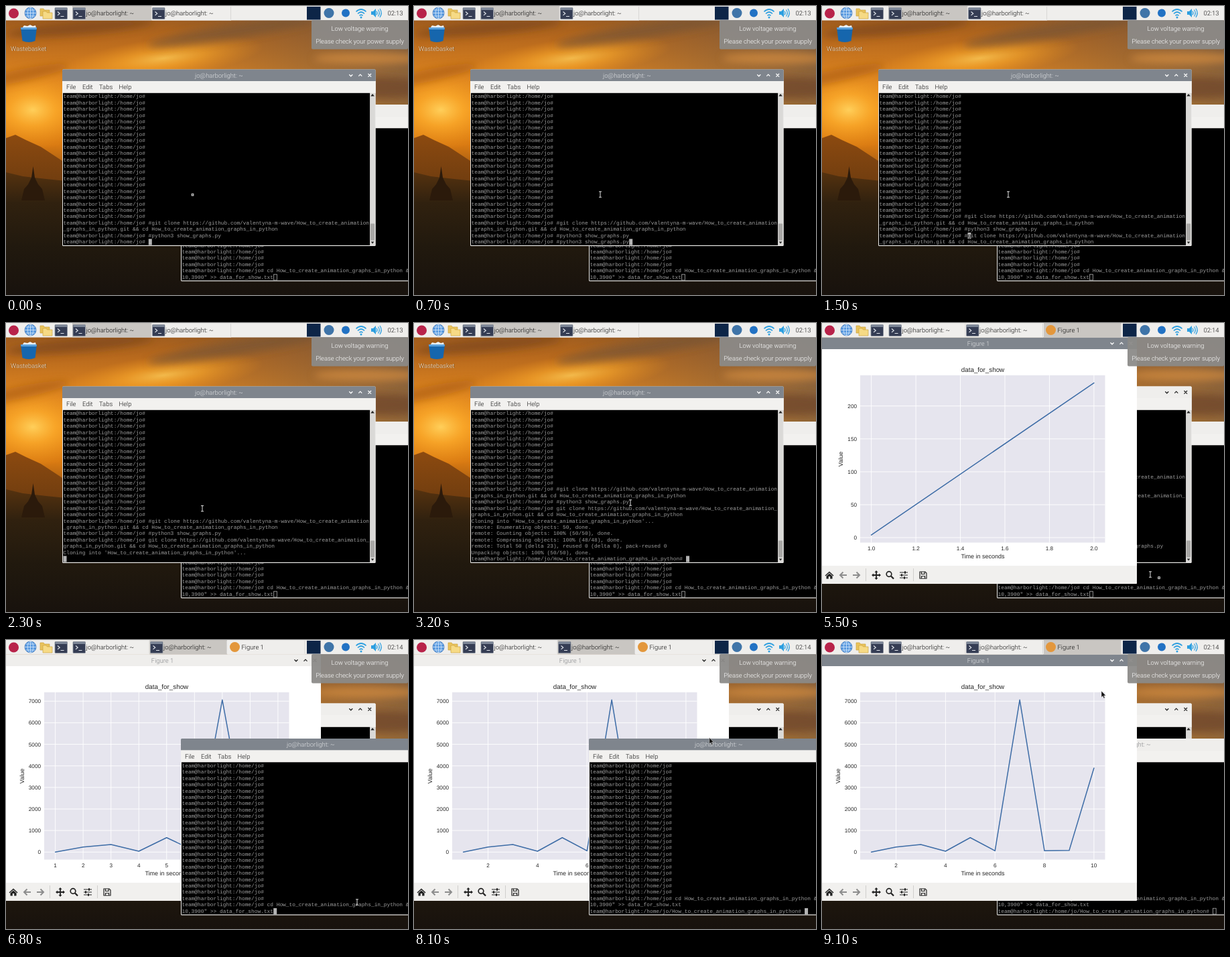
Animation of 600x431 px, one loop 9200 ms. Source, as an HTML page:

```html
<!DOCTYPE html>
<html lang="en">
<head>
<meta charset="utf-8">
<title>Animated graph demo</title>
<style>
  html, body { margin: 0; width: 100%; height: 100%; overflow: hidden; background: #1a130d; }
  svg { display: block; width: 600px; height: 431px; }
  text { white-space: pre; text-rendering: geometricPrecision; }
  .ui { font: 300 9.43px Roboto, sans-serif; }
  .mono { font: 7.857px "Liberation Mono", monospace; fill: #9c9c9c; }
  .plot { font: 8.18px "Liberation Sans", sans-serif; fill: #262626; }
  .mid { text-anchor: middle; }
  .end { text-anchor: end; }
  .bar { fill: #efeeec; }
  .title { fill: #85878a; }
  .btn { fill: none; stroke: #222; stroke-width: 1.3; }
  .focus .bar { fill: #7f858d; }
  .focus .title { fill: #dfe1e3; }
  .focus .btn { stroke: #fff; }
</style>
</head>
<body>
<svg id="stage" viewBox="0 0 600 431" xmlns="http://www.w3.org/2000/svg">
  <defs>
    <linearGradient id="sky" x1="0" y1="0" x2="0" y2="1">
      <stop offset="0" stop-color="#8f5420"/>
      <stop offset=".12" stop-color="#b96a1d"/>
      <stop offset=".24" stop-color="#dc8420"/>
      <stop offset=".36" stop-color="#ec8f1a"/>
      <stop offset=".48" stop-color="#d97a12"/>
      <stop offset=".6" stop-color="#8a4d12"/>
      <stop offset="1" stop-color="#1a130d"/>
    </linearGradient>
    <linearGradient id="east" x1="0" y1="0" x2="1" y2="0">
      <stop offset=".4" stop-color="#6b5646" stop-opacity="0"/>
      <stop offset="1" stop-color="#6b5646" stop-opacity=".7"/>
    </linearGradient>
    <linearGradient id="hill" x1="0" y1="0" x2="0" y2="1">
      <stop offset="0" stop-color="#8c4a10"/>
      <stop offset="1" stop-color="#5f350f"/>
    </linearGradient>
    <linearGradient id="land" x1="0" y1="0" x2="0" y2="1">
      <stop offset="0" stop-color="#55320f"/>
      <stop offset=".25" stop-color="#30210f"/>
      <stop offset=".6" stop-color="#21190e"/>
      <stop offset="1" stop-color="#18120d"/>
    </linearGradient>
    <radialGradient id="sun">
      <stop offset="0" stop-color="#ffcf5a"/>
      <stop offset=".4" stop-color="#fcac2c" stop-opacity=".75"/>
      <stop offset="1" stop-color="#f0951c" stop-opacity="0"/>
    </radialGradient>
    <filter id="soft" x="-50%" y="-100%" width="200%" height="300%"><feGaussianBlur stdDeviation="6"/></filter>
  </defs>

  <g id="wallpaper">
    <rect width="600" height="431" fill="url(#sky)"/>
    <rect width="600" height="200" fill="url(#east)"/>
    <ellipse cx="40" cy="155" rx="85" ry="60" fill="url(#sun)"/>
    <ellipse cx="235" cy="78" rx="150" ry="30" fill="url(#sun)" opacity=".75" transform="rotate(-7 235 78)"/>
    <g filter="url(#soft)">
      <ellipse cx="110" cy="33" rx="110" ry="10" fill="#7d461b" opacity=".7" transform="rotate(-5 110 33)"/>
      <ellipse cx="340" cy="38" rx="130" ry="11" fill="#7a5433" opacity=".7" transform="rotate(-9 340 38)"/>
      <ellipse cx="20" cy="104" rx="75" ry="9" fill="#a85a14" opacity=".65" transform="rotate(-12 20 104)"/>
      <ellipse cx="540" cy="78" rx="80" ry="9" fill="#cf8a40" opacity=".8"/>
      <ellipse cx="560" cy="122" rx="80" ry="16" fill="#70492c" opacity=".8"/>
    </g>
    <path d="M0 197L14 192 30 200 52 210 84 231 140 250V310H0Z" fill="url(#hill)"/>
    <path d="M0 248L25 254 60 258 100 262H600V431H0Z" fill="url(#land)"/>
    <path d="M23 290L27 273 33 266 38 256 40.500 239 43 256 48 266 54 273 58 290Z" fill="#2b1a0b"/>
  </g>

  <g id="bin">
    <path d="M24 33l3-4 5 1 4-2 4 2 4-1 1 4z" fill="#e9f1f6"/>
    <path d="M22 32H46L43.500 52Q34 56 24.500 52Z" fill="#1666ad"/>
    <path d="M22 32H46L45.500 35H22.500Z" fill="#5aa2de"/>
    <text class="ui mid" x="34.500" y="67.200" fill="#33200c" opacity=".6">Wastebasket</text>
    <text class="ui mid" x="33.800" y="66.500" fill="#f3ece0">Wastebasket</text>
  </g>

  <g id="windows"></g>
  <g id="panel"></g>
  <g id="note">
    <rect x="456" y="21" width="144" height="43.500" rx="2" fill="#8c8b89" opacity=".94"/>
    <g class="ui mid" fill="#fff">
      <text x="528" y="37.300">Low voltage warning</text>
      <text x="528" y="55.800">Please check your power supply</text>
    </g>
  </g>
  <g id="mouse">
    <path id="beam" d="M-2-4.200H2M0-4.200V4.200M-2 4.200H2" fill="none" stroke="#ddd"/>
    <path id="arrow" d="M0-2V7.500L2.100 5.500 3.600 9 5.200 8.300 3.700 5H6.600Z" fill="#111" stroke="#eee" stroke-width=".5"/>
  </g>
  <rect id="dot" width="2.600" height="2.600" fill="#000" stroke="#eee"/>
</svg>

<script>
const LOOP = 9200, STEP = 100;
const CW = 4.714, RH = 9.43, ROWS = 24;
const $ = id => document.getElementById(id);
const at = (table, t) => table.filter(s => s[0] <= t).pop();

// ---------- window parts ----------
const HOST = 'jo@harborlight: ~';

function buttons(x, y) {
  return `<path class="btn" d="M${x - 30.5} ${y - 1}l2.500 2.500 2.500-2.500M${x - 16.5} ${y + 1.3}l2.500-2.500 2.500 2.500
    M${x - 2.3} ${y - 2.3}l4.600 4.600m0-4.600l-4.600 4.600"/>`;
}

function makeWindow(id, x, y, w, h, title, body) {
  const g = document.createElementNS('http://www.w3.org/2000/svg', 'g');
  g.id = id;
  g.innerHTML = `<rect x="${x}" y="${y}" width="${w}" height="${h}" rx="1.500" fill="#e9e8e6"/>
    <path class="bar" d="M${x} ${y + 17.5}v-16q0-1.500 1.500-1.500h${w - 3}q1.500 0 1.500 1.500v16z"/>
    <text class="ui mid title" x="${x + w / 2}" y="${y + 12.3}">${title}</text>
    ${buttons(x + w - 9, y + 8.8)}${body}`;
  $('windows').append(g);
  return g;
}

function makeTerm(id, x, y, cols) {
  const w = cols * CW + 10.5, h = 263.5, sx = x + w - 8.5;
  const menu = [['File', 6], ['Edit', 30], ['Tabs', 55], ['Help', 84.5]];
  let body = `<rect x="${x}" y="${y + 17.5}" width="${w}" height="18" fill="#f2f1ef"/>`;
  for (const [name, dx] of menu)
    body += `<text class="ui" x="${x + dx}" y="${y + 29.5}" fill="#111">${name}</text>`;
  body += `<rect x="${x + 1}" y="${y + 35.3}" width="${w - 9.5}" height="${h - 36.5}" fill="#000"/>
    <rect x="${sx}" y="${y + 35.3}" width="7.500" height="${h - 36.5}" fill="#dad9d7"/>
    <rect x="${sx + .8}" y="${y + 230}" width="6" height="25" rx="1" fill="#a8a7a5"/>
    <path d="M${sx + 1} ${y + 40}l2.800-3.500 2.800 3.500zM${sx + 1.5} ${y + 257}h4.600l-2.300 3z" fill="#222"/>`;
  const ox = x + 1.5, oy = y + 36;
  for (let i = 0; i < ROWS; i++)
    body += `<text class="mono row" x="${ox}" y="${(oy + i * RH + 6.8).toFixed(2)}"></text>`;
  body += '<rect class="caret" width="5" height="9"/><text class="mono under" style="fill:#000"></text>';
  const g = makeWindow(id, x, y, w, h, HOST, body);
  const rows = [...g.querySelectorAll('.row')];
  const caret = g.querySelector('.caret'), under = g.querySelector('.under');

  return (view, focused) => {
    rows.forEach((r, i) => {
      const s = view.lines[i] || '';
      if (r.textContent !== s) r.textContent = s;
    });
    const cx = ox + view.col * CW, cy = oy + view.row * RH;
    const set = (n, o) => { for (const k in o) n.setAttribute(k, o[k]); };
    set(caret, focused
      ? { x: cx, y: cy, width: 5, height: 9.2, fill: '#b4b4b4', stroke: 'none' }
      : { x: cx + .5, y: cy + .3, width: 4.6, height: 8.8, fill: 'none', stroke: '#b4b4b4', 'stroke-width': .8 });
    set(under, { x: cx, y: cy + 6.8 });
    under.textContent = focused ? (view.lines[view.row] || '')[view.col] || '' : '';
  };
}

// ---------- terminal content ----------
const REPO = 'How_to_create_animation_graphs_in_python';
const HOME = 'team@harborlight:/home/jo# ';
const DEEP = `team@harborlight:/home/jo/${REPO}# `;
const CLONE = `git clone https://github.com/valentyna-m-wave/${REPO}.git && cd ${REPO}`;
const SHOW = 'python3 show_graphs.py';
const OUT = [
  `Cloning into '${REPO}'...`,
  'remote: Enumerating objects: 50, done.',
  'remote: Counting objects: 100% (50/50), done.',
  'remote: Compressing objects: 100% (48/48), done.',
  'remote: Total 50 (delta 23), reused 0 (delta 0), pack-reused 0',
  'Unpacking objects: 100% (50/50), done.'
];
const blank = n => Array(n).fill(HOME);
const LOG = [...blank(20), HOME + '#' + CLONE, HOME + '#' + SHOW];
const LOG2 = [...LOG, HOME + CLONE];
const DONE = [...LOG2, ...OUT];

// time, finished lines, prompt, typed text, caret place in the typed text
const MAIN = [
  [0, LOG, HOME, '', 0],
  [700, LOG, HOME, '#' + SHOW, 23],
  [1000, LOG, HOME, '#' + CLONE, 139],
  [1300, LOG, HOME, '#' + CLONE, 0],
  [1400, LOG, HOME, '#' + CLONE, 1],
  [1700, LOG, HOME, CLONE, 0],
  [2000, LOG2, '', '', 0],
  [2100, [...LOG2, OUT[0]], '', '', 0],
  [2400, [...LOG2, ...OUT.slice(0, 5)], '', '', 0],
  [2700, DONE, DEEP, '', 0],
  [3400, DONE, DEEP, CLONE, 138],
  [3600, DONE, DEEP, '#' + SHOW, 23],
  [3900, DONE, DEEP, '#' + SHOW, 1],
  [4100, DONE, DEEP, SHOW, 0],
  [4500, [...DONE, DEEP + SHOW], '', '', 0]
];
const ADD = `cd ${REPO} && echo "10,3900" >> data_for_show.txt`;
const SIDE = [
  [0, blank(22), HOME, ADD, ADD.length],
  [7300, [...blank(22), HOME + ADD], DEEP, '', 0]
];

function wrap(s, cols) {
  const out = [];
  do { out.push(s.slice(0, cols)); s = s.slice(cols); } while (s);
  return out;
}

// The scroll never goes back, even when the typed text gets shorter.
function termViews(states, cols) {
  let top = 0;
  return states.map(([time, log, prompt, typed, pos]) => {
    const past = log.flatMap(s => wrap(s, cols));
    const all = [...past, ...wrap(prompt + typed, cols)];
    top = Math.max(top, all.length - ROWS);
    const place = prompt.length + pos;
    return [time, {
      lines: all.slice(top),
      row: past.length + Math.floor(place / cols) - top,
      col: place % cols
    }];
  });
}
const mainViews = termViews(MAIN, 97), sideViews = termViews(SIDE, 80);

// ---------- figure ----------
const DATA = [4, 235, 350, 40, 670, 60, 7060, 60, 80, 3900];
const BOX = { l: 57, r: 422.5, t: 78, b: 327.5 };

function ticks(lo, hi) {
  const raw = (hi - lo) / 9, mag = 10 ** Math.floor(Math.log10(raw));
  const step = [1, 2, 2.5, 5, 10].find(k => k * mag >= raw) * mag;
  const digits = step >= 1 ? 0 : /25$/.test(step.toFixed(2)) ? 2 : 1;
  const list = [];
  for (let i = Math.ceil(lo / step); i * step <= hi; i++)
    list.push([i * step, (i * step).toFixed(digits)]);
  return list;
}

function axis(min, max, from, to) {
  const pad = (max - min) * .05, lo = min - pad, hi = max + pad;
  return { map: v => +(from + (v - lo) / (hi - lo) * (to - from)).toFixed(2), list: ticks(lo, hi) };
}

function drawPlot(n) {
  const ys = DATA.slice(0, n);
  const X = axis(1, n, BOX.l, BOX.r);
  const Y = axis(Math.min(...ys), Math.max(...ys), BOX.b, BOX.t);
  let grid = '', labels = '', widest = 0;
  for (const [v, s] of X.list) {
    grid += `M${X.map(v)} ${BOX.t}V${BOX.b}`;
    labels += `<text class="mid" x="${X.map(v)}" y="339.200">${s}</text>`;
  }
  for (const [v, s] of Y.list) {
    grid += `M${BOX.l} ${Y.map(v)}H${BOX.r}`;
    labels += `<text class="end" x="52" y="${Y.map(v) + 3}">${s}</text>`;
    widest = Math.max(widest, s.length * 4.55);
  }
  const lx = 52 - widest - 7;
  $('plot').innerHTML = `<rect x="${BOX.l}" y="${BOX.t}" width="365.500" height="249.500" fill="#e6e5ee"/>
    <path d="${grid}" stroke="#fff" stroke-width=".9"/>${labels}
    <polyline points="${ys.map((v, i) => X.map(i + 1) + ',' + Y.map(v)).join(' ')}"
      fill="none" stroke="#3d6ca6" stroke-width="1.500" stroke-linejoin="round" stroke-linecap="round"/>
    <text class="mid" x="240" y="73" style="font-size:9.820px">data_for_show</text>
    <text class="mid" x="240" y="351" style="font-size:9px">Time in seconds</text>
    <text class="mid" transform="translate(${lx} 203) rotate(-90)" style="font-size:9px">Value</text>`;
}

const TOOLS = `<rect x="-3" y="362" width="473" height="26.500" fill="#f1f0ee"/>
  <path d="M65.500 366v19M136.500 366v19" stroke="#d0cfcd"/>
  <path d="M4.500 376.500L11 370.500 17.500 376.500 16.500 377.500 11 372.500 5.500 377.500ZM6.500 377.500L11 373.500 15.500 377.500V381.500H12.200V378H9.800V381.500H6.500Z" fill="#222"/>
  <path d="M37 376H27M31.500 371.500L27 376 31.500 380.500M46 376H56M51.500 371.500L56 376 51.500 380.500" fill="none" stroke="#8d8d8d" stroke-width="2"/>
  <path d="M81 370.500V381.500M75.500 376H86.500" stroke="#222" stroke-width="1.800"/>
  <path d="M81 369l2.500 3h-5zM81 383l2.500-3h-5zM74 376l3-2.500v5zM88 376l-3-2.500v5z" fill="#222"/>
  <circle cx="100" cy="374.500" r="3.800" fill="none" stroke="#222" stroke-width="1.700"/>
  <path d="M103 377.500L107 381.500" stroke="#222" stroke-width="2.300"/>
  <path d="M116 372H128M116 376H128M116 380H128" stroke="#222" stroke-width="1.200"/>
  <path d="M124 370.200v3.600M119 374.200v3.600M123 378.200v3.600" stroke="#222" stroke-width="2"/>
  <path d="M146 371H154L156 373V381H146ZM148.500 371V374.500H153V371M148.500 381V377.500H153.500V381" fill="none" stroke="#222" stroke-width="1.200"/>`;

// ---------- build ----------
const drawSide = makeTerm('side', 261, 147, 80);
const drawMain = makeTerm('main', 84, 94.5, 97);
makeWindow('figure', -3, 21.5, 473, 367.5, 'Figure 1',
  `<rect x="-3" y="39" width="473" height="323" fill="#fff"/><g id="plot" class="plot"></g>${TOOLS}`);

function termIcon(x) {
  return `<rect x="${x}" y="2.500" width="18.500" height="17" rx="1" fill="#353d54" stroke="#8f959f" stroke-width=".8"/>
    <rect x="${x + .5}" y="3" width="17.500" height="3" fill="#7d8798"/>
    <path d="M${x + 4} 8.500l3.200 2.700-3.200 2.700M${x + 8.5} 15.500h5" fill="none" stroke="#dfe3ea" stroke-width="1.200"/>`;
}

function task(x, w, on, icon, name) {
  return `<rect x="${x - 1}" y="0" width="${w}" height="21.500" fill="${on ? '#c9c6c2' : '#efeeec'}"/>
    <path d="M${x + w - 1.5} 1V20.500" stroke="#d8d7d5"/>${icon}
    <text class="ui" x="${x + 19.5}" y="14.300" fill="#111">${name}</text>`;
}

function drawPanel(focus, open, clock) {
  const w = open ? 115.5 : 118.5, x2 = 100 + w;
  $('panel').innerHTML = `<rect width="600" height="21.500" fill="#efeeec"/>
    <circle cx="11.500" cy="11" r="7.500" fill="#b8234a"/>
    <circle cx="36.500" cy="10.500" r="8.500" fill="#5b9be0" stroke="#3a73b8" stroke-width=".8"/>
    <path d="M28 10.500H45M30 6H43M30 15H43M36.500 2V19" stroke="#d5e7fa" stroke-width=".8"/>
    <ellipse cx="36.500" cy="10.500" rx="4.200" ry="8.500" fill="none" stroke="#d5e7fa" stroke-width=".8"/>
    <path d="M51 4h5l1.500 2H65V15H51Z" fill="#e9c35c" stroke="#c79d35" stroke-width=".6"/>
    <path d="M55 8h5l1.500 2H69V19H55Z" fill="#f6da85" stroke="#c79d35" stroke-width=".6"/>
    ${termIcon(73)}
    ${task(100, w, focus === 'main', termIcon(100), HOST)}
    ${task(x2, w, focus === 'side', termIcon(x2), HOST)}
    ${open ? task(332, w, focus === 'figure', '<circle cx="341.500" cy="10.500" r="7.500" fill="#e3973c"/>', 'Figure 1') : ''}
    <rect x="449" y="1" width="20.500" height="19.500" fill="#0d2547"/>
    <circle cx="482" cy="10.500" r="7.500" fill="#3f74a8"/>
    <circle cx="507" cy="10.500" r="6" fill="#2272c4"/>
    <g fill="none" stroke="#2d9fe0" stroke-width="1.700">
      <path d="M522.500 8.500Q530 1.500 537.500 8.500M525 11.500Q530 6.500 535 11.500M527.500 14.300Q530 11.800 532.500 14.300"/>
      <path d="M553 7.500Q555 10.500 553 13.500M555.500 5.500Q559 10.500 555.500 15.500M558 4Q562.500 10.500 558 17" stroke-width="1.200"/>
    </g>
    <circle cx="530" cy="17" r="1.500" fill="#2d9fe0"/>
    <path d="M545 8h3l4-4v13l-4-4h-3z" fill="#2d9fe0"/>
    <text class="ui" x="569.500" y="14.300" fill="#111">${clock}</text>`;
}

// ---------- timeline ----------
const STACK = [
  [0, ['side', 'main']],
  [5000, ['side', 'main', 'figure']],
  [5900, ['main', 'figure', 'side']],
  [8400, ['main', 'side', 'figure']]
];
const PATH = [
  [0, 278, 281], [2100, 278, 281], [2700, 323, 268], [4700, 323, 268],
  [5500, 490, 375], [6000, 524, 391], [7400, 524, 391], [8300, 417, 78], [LOOP, 417, 78]
];

function mouseAt(t) {
  const i = PATH.findIndex(p => p[0] > t);
  const [t0, x0, y0] = PATH[i - 1], [t1, x1, y1] = PATH[i];
  const k = (t - t0) / (t1 - t0);
  return [x0 + (x1 - x0) * k, y0 + (y1 - y0) * k];
}

function points(t) {
  if (t >= 7800) return 10;
  return Math.max(2, Math.min(9, 2 + Math.floor((t - 5400) / 180)));
}

const seen = {};
function once(key, value, fn) {
  if (seen[key] === value) return;
  seen[key] = value;
  fn();
}

function draw(t) {
  const stack = at(STACK, t)[1], focus = stack[stack.length - 1];
  const open = stack.includes('figure'), clock = t < 3900 ? '02:13' : '02:14';
  once('stack', stack, () => {
    $('figure').style.display = open ? '' : 'none';
    for (const id of stack) $('windows').append($(id));
    for (const id of ['main', 'side', 'figure']) $(id).classList.toggle('focus', id === focus);
  });
  once('panel', focus + open + clock, () => drawPanel(focus, open, clock));
  once('plot', points(t), () => drawPlot(points(t)));
  const [a, mainView] = at(mainViews, t), [b, sideView] = at(sideViews, t);
  once('main', a + focus, () => drawMain(mainView, focus === 'main'));
  once('side', b + focus, () => drawSide(sideView, focus === 'side'));

  const [x, y] = mouseAt(t), early = t < 300, lead = t >= 4800 && t < 5900;
  const arrow = y < 165 || (focus === 'figure' && x < 470 && y < 389);
  $('mouse').setAttribute('transform', `translate(${x} ${y})`);
  $('beam').style.display = arrow || early ? 'none' : '';
  $('arrow').style.display = arrow ? '' : 'none';
  $('dot').style.display = early || lead ? '' : 'none';
  $('dot').setAttribute('x', x + (lead ? 11.7 : -.8));
  $('dot').setAttribute('y', y + (lead ? 3.7 : -.8));
}

const start = performance.now();
function tick() {
  const t = (performance.now() - start) % LOOP;
  draw(Math.floor(t / STEP) * STEP);
  requestAnimationFrame(tick);
}
tick();
</script>
</body>
</html>
```
